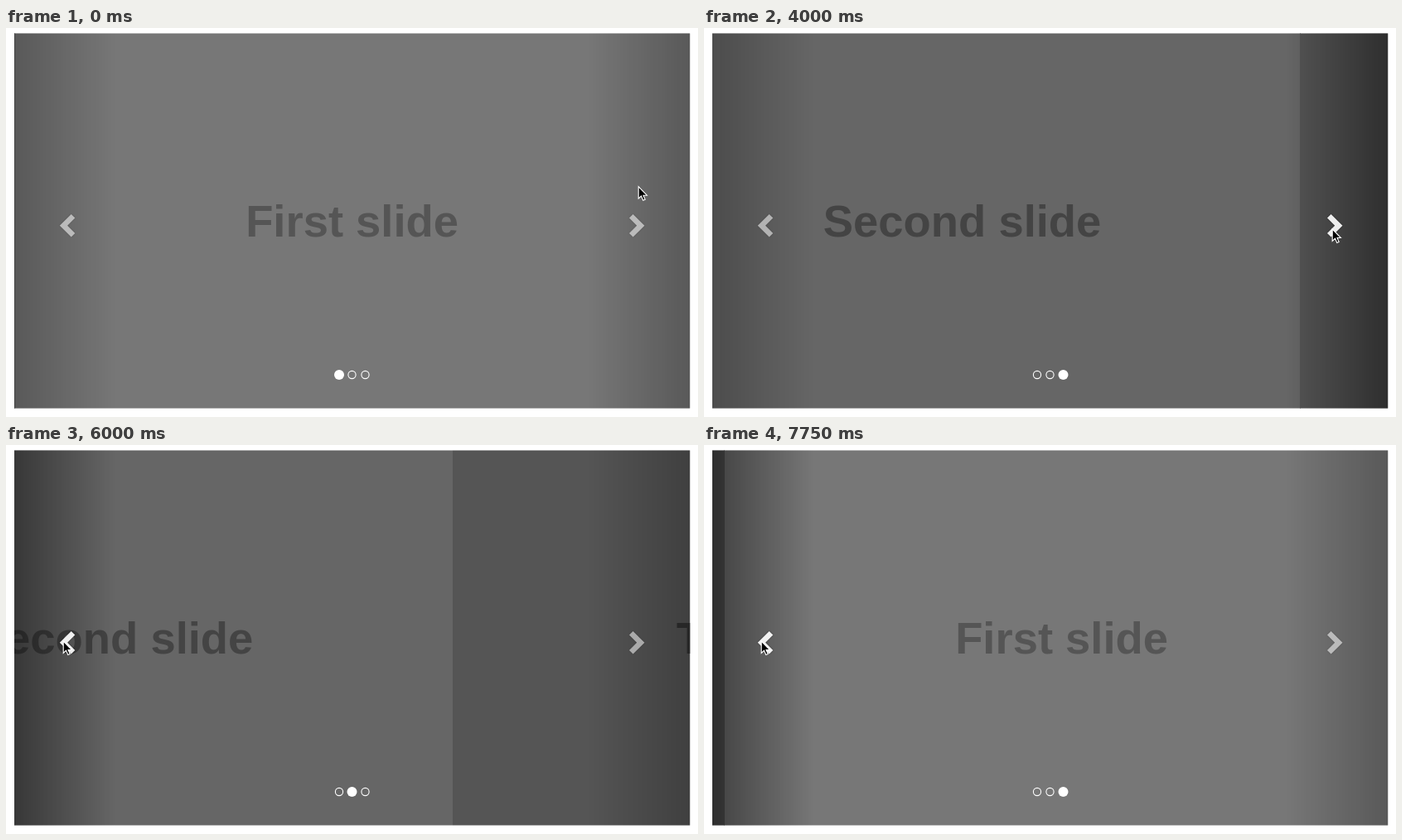
Animation, 835 px wide and 470 px high, one loop 8 s. Source, as an HTML page:

```html
<!DOCTYPE html>
<html lang="en">
<head>
<meta charset="utf-8">
<title>Carousel</title>
<style>
  html, body { margin: 0; width: 100%; height: 100%; overflow: hidden; background: #fff; }
  svg { display: block; }
  text { font: bold 54.4px "Liberation Sans", Arial, sans-serif; text-anchor: middle; }
  .chevron { fill: #fff; filter: drop-shadow(0 .7px 1px rgba(0, 0, 0, .5)); }
  .dots circle { fill: none; stroke: #fff; stroke-width: 1.1; r: 4.6px; }
  .dots .active { fill: #fff; stroke: none; r: 6px; }
</style>
</head>
<body>
<svg width="835" height="470" viewBox="0 0 835 470">
  <defs>
    <clipPath id="frame"><rect x="10" y="6.5" width="815.3" height="453"/></clipPath>
    <linearGradient id="shade">
      <stop offset="0" stop-opacity=".5"/>
      <stop offset="1" stop-opacity="0"/>
    </linearGradient>
    <g id="control">
      <rect x="10" y="6" width="122.3" height="454" fill="url(#shade)"/>
      <path class="chevron" d="M78.7 225l4.6 4.6-9.2 9.2 9.2 9.2-4.6 4.6L64.8 238.8z"/>
    </g>
  </defs>
  <g clip-path="url(#frame)">
    <g class="slide" fill="#777"><rect x="10" y="6" width="816" height="454"/><text x="417.6" y="252" fill="#555">First slide</text></g>
    <g class="slide" fill="#666"><rect x="10" y="6" width="816" height="454"/><text x="417.6" y="252" fill="#444">Second slide</text></g>
    <g class="slide" fill="#555"><rect x="10" y="6" width="816" height="454"/><text x="417.6" y="252" fill="#333">Third slide</text></g>
    <use id="prev" href="#control"/>
    <use id="next" href="#control" transform="matrix(-1 0 0 1 835.3 0)"/>
  </g>
  <g class="dots">
    <circle cx="402" cy="419"/><circle cx="417.5" cy="419"/><circle cx="433.5" cy="419"/>
  </g>
  <path id="cursor" d="M0 0V14.4l3.3-3.1 2.3 5.2 2.4-1-2.2-5h4.4z" stroke="#fff" stroke-width="1.1"/>
</svg>
<script>
const LOOP = 8000, STEP = 250, SLIDE_TIME = 900, WIDTH = 815.3;

// dir 1: the new slide enters from the right; -1: from the left
const moves = [
  { start: -SLIDE_TIME, from: 2, to: 0, dir: 1 },
  { start: 2430, from: 0, to: 1, dir: 1 },
  { start: 3774, from: 1, to: 2, dir: 1 },
  { start: 5471, from: 2, to: 1, dir: -1 },
  { start: 6513, from: 1, to: 0, dir: -1 },
  { start: 7666, from: 0, to: 2, dir: -1 },
];

// time, x, y of the pointer tip
const pointerPath = [
  [0, 763.2, 191.7], [250, 769, 213], [500, 761, 246], [750, 758.2, 243],
  [4600, 758.2, 243], [5000, 125.7, 231.7], [5250, 69.2, 237],
];

const slides = document.querySelectorAll('.slide');
const dots = document.querySelectorAll('.dots circle');
const [prev, next, cursor] = ['prev', 'next', 'cursor'].map(id => document.getElementById(id));

const bezier = (s, a, b) => 3 * s * (1 - s) ** 2 * a + 3 * s * s * (1 - s) * b + s ** 3;

// CSS ease-in-out, inverted by bisection
function easeInOut(x) {
  if (x >= 1) return 1;
  let low = 0, high = 1;
  for (let i = 0; i < 20; i++) {
    const mid = (low + high) / 2;
    if (bezier(mid, .42, .58) < x) low = mid; else high = mid;
  }
  return bezier(low, 0, 1);
}

function pointerAt(t) {
  const i = pointerPath.findIndex(point => point[0] > t);
  if (i < 0) return pointerPath.at(-1).slice(1);
  const [t0, x0, y0] = pointerPath[i - 1], [t1, x1, y1] = pointerPath[i];
  const k = (t - t0) / (t1 - t0);
  return [x0 + (x1 - x0) * k, y0 + (y1 - y0) * k];
}

function draw(t) {
  const { start, from, to, dir } = moves.findLast(move => move.start <= t);
  const progress = easeInOut((t - start) / SLIDE_TIME);
  slides.forEach((slide, i) => {
    const offset = i === to ? dir * (1 - progress) : i === from ? -dir * progress : 2;
    slide.setAttribute('transform', `translate(${Math.round(offset * WIDTH)})`);
  });
  dots.forEach((dot, i) => dot.classList.toggle('active', i === to));
  prev.style.opacity = t >= 5250 ? .9 : .5;
  next.style.opacity = t >= 2000 && t < 5471 ? .9 : .5;
  cursor.setAttribute('transform', `translate(${pointerAt(t)})`);
}

function tick() {
  draw(Math.floor(performance.now() % LOOP / STEP) * STEP);
  requestAnimationFrame(tick);
}
tick();
</script>
</body>
</html>
```
